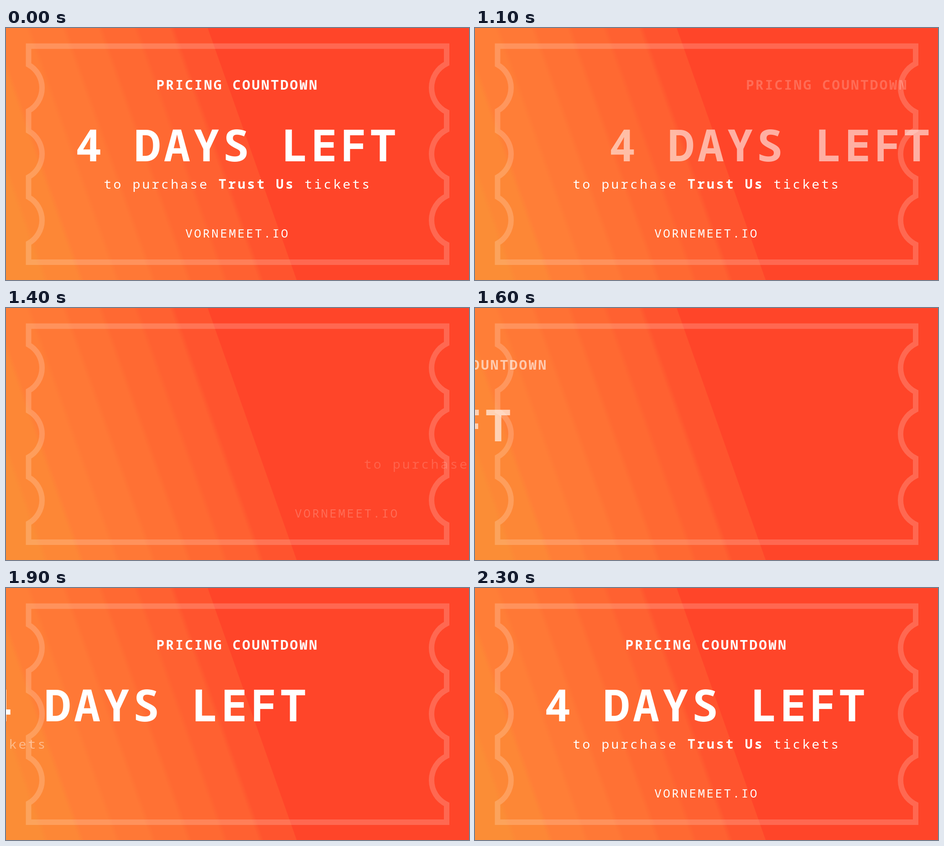
Recreate the animation shown at these times as an HTML page. Size 1015x552 px, loop 2.4 s.

```html
<!DOCTYPE html>
<html lang="en">
<head>
<meta charset="utf-8">
<title>Pricing countdown</title>
<style>
  html, body { margin: 0; width: 100%; height: 100%; overflow: hidden; background: #ff452a; }
  svg { display: block; width: 1015px; height: 552px; }
  text { fill: #fff; font-family: "Noto Sans Mono", "DejaVu Sans Mono", monospace; white-space: pre; }
  .bold { font-weight: 700; }
</style>
</head>
<body>
<svg viewBox="0 0 1015 552">
  <defs>
    <linearGradient id="bands" gradientUnits="userSpaceOnUse" x1="-187" y1="0" x2="443" y2="0"
      gradientTransform="skewX(19.45)"></linearGradient>
  </defs>
  <rect width="1015" height="552" fill="url(#bands)"/>
  <path id="ticket" fill="none" stroke="#fff" stroke-opacity=".19" stroke-width="12"/>
  <text id="head" class="bold" y="135">PRICING COUNTDOWN</text>
  <text id="days" class="bold" y="292">4 DAYS LEFT</text>
  <text id="sub" y="352">to purchase <tspan class="bold">Trust Us</tspan> tickets</text>
  <text id="site" y="459">VORNEMEET.IO</text>
</svg>
<script>
const WIDTH = 1015, LOOP = 2400, TICK = 100;
const LEAVE = 1000, BLANK = 1500, ENTER = 1600;
const el = id => document.getElementById(id);

// Slanted background bands with slightly soft edges, ending in a hard one
function buildBands() {
  const colors = [
    [251, 141, 54], [253, 135, 54], [255, 126, 55], [255, 120, 54],
    [255, 113, 52], [255, 105, 50], [255, 97, 49], [255, 84, 46]
  ];
  const red = [255, 69, 41];
  const n = colors.length;
  const stop = (at, color) => `<stop offset="${at}" stop-color="rgb(${color})"/>`;
  const stops = colors.map((c, i) => {
    const from = i ? 0.08 : 0;
    const to = i < n - 1 ? 0.92 : 0.98;
    return stop((i + from) / n, c) + stop((i + to) / n, c);
  });
  el("bands").innerHTML = stops.join("") + stop(1, red);
}

// Ticket outline, drawn clockwise, with three notches on each side
function buildTicket() {
  const left = 49.5, right = 966, top = 39.8, bottom = 513;
  const notches = [131, 276, 421];
  const notch = (x, y, half, r) =>
    `L${x} ${y - half}A${r} ${r} 0 0 0 ${x} ${y + half}`;
  const rightSide = notches.map(y => notch(right, y, 53, 59));
  const leftSide = notches.reverse().map(y => notch(left, y, -50.5, 58));
  el("ticket").setAttribute("d",
    `M${left} ${top}H${right}${rightSide.join("")}V${bottom}H${left}${leftSide.join("")}Z`);
}

// x: first cell, end: right edge; start and time: entrance; fade: base and gain
const lines = [
  { id: "head", x: 329.4, end: 683, size: 29.4, pitch: 20.93, start: 1470, time: 408, fade: [0.47, 0.41] },
  { id: "days", x: 152.6, end: 853, size: 96.6, pitch: 64.5, start: 1480, time: 617, fade: [0.4, 1.16] },
  { id: "sub", x: 214.6, end: 797, size: 28, pitch: 20.95, start: 1820, time: 375, fade: [0.2, 1.03] },
  { id: "site", x: 393.2, end: 618, size: 26, pitch: 19.05, start: 1996, time: 300, fade: [0.1, 0.92] }
];

function buildLines() {
  for (const line of lines) {
    line.node = el(line.id);
    line.node.setAttribute("x", line.x);
    line.node.style.fontSize = line.size + "px";
    line.node.style.letterSpacing = line.pitch - line.size * 0.6 + "px";
  }
}

// Each line leaves one tick after the line above it
function leaving(line, i, t) {
  const k = (t - LEAVE) / TICK - i;
  if (k < 0) return [0, 1];
  if (k > 2) return [0, 0];
  return [(WIDTH - line.x) * (0.44 + 0.2086 * k) ** 2.2, [0.57, 0.21, 0.16][k]];
}

function entering(line, t) {
  const u = (t - line.start) / line.time;
  if (u <= 0) return [0, 0];
  if (u >= 1) return [0, 1];
  const rest = (1 + Math.cos(Math.PI * u)) / 2;
  return [-line.end * rest, Math.min(1, line.fade[0] + line.fade[1] * u)];
}

function pose(line, i, t) {
  if (t < BLANK) return leaving(line, i, t);
  return t < ENTER ? [0, 0] : entering(line, t);
}

const begin = performance.now();

function draw() {
  const now = Math.max(0, performance.now() - begin) % LOOP;
  const t = Math.floor(now / TICK) * TICK;
  lines.forEach((line, i) => {
    const [dx, alpha] = pose(line, i, t);
    line.node.setAttribute("transform", `translate(${dx.toFixed(2)} 0)`);
    line.node.setAttribute("opacity", alpha.toFixed(3));
  });
  requestAnimationFrame(draw);
}

buildBands();
buildTicket();
buildLines();
draw();
</script>
</body>
</html>
```
